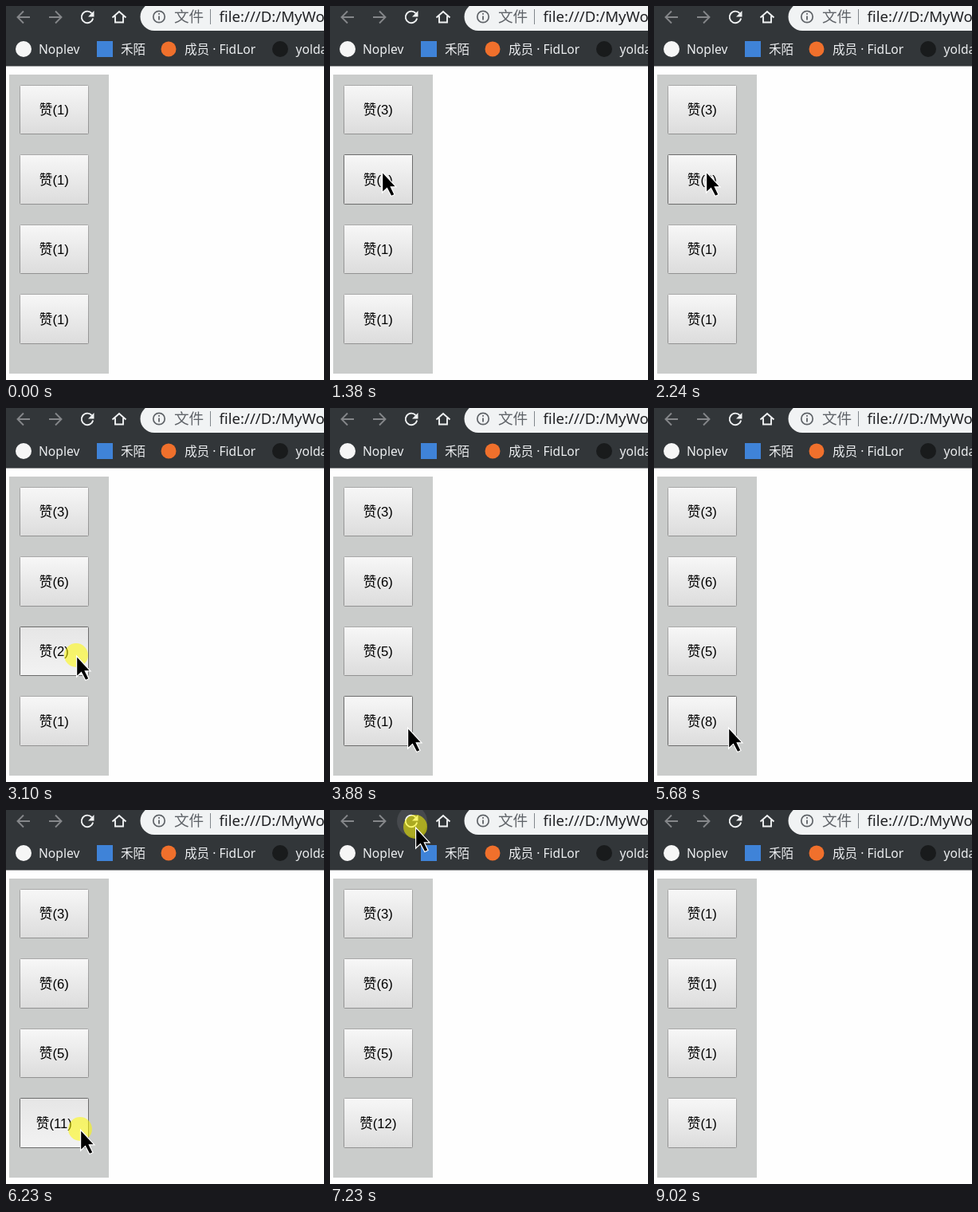
An HTML page that plays this animation: 399x469 px, repeating every 9.93 s.

```html
<!DOCTYPE html>
<html lang="zh-CN">
<head>
<meta charset="utf-8">
<title>赞</title>
<style>
  html, body { margin: 0; width: 100%; height: 100%; overflow: hidden; background: #fefefe; }
  svg { display: block; width: 399px; height: 469px; cursor: default; }
  text { white-space: pre; }
  .ui { font-family: "Noto Sans", "Open Sans", "Noto Sans CJK SC", "Noto Sans CJK", sans-serif; }
  .mark { font-size: 15.6px; fill: #eceef0; }
  .url { font-size: 18.6px; }
  .icon { fill: none; stroke: #f1f3f4; stroke-width: 1.9; }
  .dim { stroke: #85878a; }
  .btn rect { fill: url(#up); stroke: url(#edge); }
  .btn text { font: 16.67px "Liberation Sans", "Noto Sans CJK SC", "Noto Sans CJK", sans-serif; text-anchor: middle; }
  .btn.hover rect { stroke: #6c6c6c; }
  .btn.active rect { fill: url(#down); }
</style>
</head>
<body>
<svg viewBox="0 0 399 469">
  <defs>
    <linearGradient id="up" x2="0" y2="1">
      <stop stop-color="#f7f7f7"/><stop offset="1" stop-color="#dcdcdc"/>
    </linearGradient>
    <linearGradient id="down" x2="0" y2="1">
      <stop stop-color="#e6e6e6"/><stop offset="1" stop-color="#f2f2f2"/>
    </linearGradient>
    <linearGradient id="edge" x2="0" y2="1">
      <stop stop-color="#a8a8a8"/><stop offset="1" stop-color="#929292"/>
    </linearGradient>
  </defs>

  <rect width="399" height="75.5" fill="#323639"/>
  <circle id="glow" cx="103" cy="14" r="19" fill="#46494d"/>
  <path class="icon dim" d="M30 14H15M22 6.5L14.5 14L22 21.5"/>
  <path class="icon dim" d="M54 14H69M62 6.5L69.500 14L62 21.5"/>
  <path class="icon" d="M107.500 9A7.300 7.300 0 1 0 109.200 15.500"/>
  <path d="M110.500 6V13.500H103Z" fill="#f1f3f4"/>
  <path class="icon" d="M133.500 14.500L142 7L150.500 14.500M137 12.500V20.500H147V12.500"/>

  <rect x="168.500" y="-4" width="260" height="35" rx="17.500" fill="#f1f3f4"/>
  <circle cx="192" cy="13.500" r="7.200" fill="none" stroke="#5f6368" stroke-width="1.700"/>
  <path d="M192 12.500V17.500M192 9V10.800" stroke="#5f6368" stroke-width="1.800"/>
  <text class="ui url" x="211" y="19.500" fill="#5f6368">文件</text>
  <path d="M256.500 4V23" stroke="#80868b"/>
  <text class="ui url" x="267.500" y="19.500" fill="#202124">file:///D:/MyWork</text>

  <circle cx="22" cy="54" r="10" fill="#f6f6f6"/>
  <text class="ui mark" x="41" y="60">Noplev</text>
  <rect x="114" y="44" width="20" height="20" fill="#3f83d8"/>
  <text class="ui mark" x="144" y="60">禾陌</text>
  <circle cx="204" cy="54" r="9.500" fill="#f0702c"/>
  <text class="ui mark" x="224" y="60">成员 · FidLor</text>
  <circle cx="344" cy="54" r="10" fill="#191b1c"/>
  <text class="ui mark" x="363.500" y="60">yoldan</text>

  <rect x="4" y="86" width="125" height="375" fill="#cacccb"/>
  <g id="list"></g>
  <circle id="press" r="15" fill="#fffa00" fill-opacity=".55"/>
  <path id="arrow" d="M.6 1V27L6.500 21.500L11.800 31.500L16 29.500L11.300 19.800H18Z" fill="#000" stroke="#fff" stroke-width="1.200"/>
</svg>
<script>
const LOOP = 9930, STEP = 75, GAP = 78;
const ENTER = 220, LEAVE = 9020, RESET = 7380;
const $ = id => document.getElementById(id);

// each move eases on from the last place; bend is an optional control point
const moves = [
  { at: ENTER, steps: 1, to: [201, 279] },
  { at: 300, steps: 4, to: [72, 152] },
  { at: 1230, steps: 3, to: [65, 207] },
  { at: 2310, steps: 7, to: [88, 310] },
  { at: 3640, steps: 4, to: [97, 400] },
  { at: 3970, steps: 1, to: [93, 400] },
  { at: 6690, steps: 7, to: [107, 21], bend: [300, 230] },
  { at: 8000, steps: 2, to: [275, 307] },
  { at: 8230, steps: 3, to: [321, 394] },
  { at: 8690, steps: 4, to: [335, 456] }
];

// bursts of even clicks per button: first press, last release, count
const bursts = [
  [[610, 1000, 2]],
  [[1460, 1840, 3], [2010, 2240, 2]],
  [[2880, 3410, 4]],
  [[3970, 4750, 3], [4820, 5130, 2], [5360, 5680, 2], [5760, 6150, 3], [6230, 6610, 1]]
];
const reload = [[7230, 7300, 1]];

// releases so far, and whether the button is held now
function clicks(list, t) {
  let count = 0, held = false;
  for (const [from, to, n] of list) {
    if (t < from) break;
    const period = (to - from + GAP) / n;
    const done = Math.min(n, Math.floor((t - from + GAP) / period));
    count += done;
    held = done < n && t >= from + done * period;
  }
  return { count, held };
}

const buttons = bursts.map((list, i) => {
  const add = (parent, tag, attrs) => {
    const el = document.createElementNS("http://www.w3.org/2000/svg", tag);
    for (const k in attrs) el.setAttribute(k, attrs[k]);
    return parent.appendChild(el);
  };
  const top = Math.floor(99 + 87.5 * i), bottom = Math.floor(161.5 + 87.5 * i);
  const g = add($("list"), "g", { class: "btn" });
  add(g, "rect", { x: 17.5, y: top + .5, width: 86, height: bottom - top - 1, rx: 1 });
  const label = add(g, "text", { x: 60.3, y: Math.round((top + bottom) / 2) + 6 });
  return { g, label, top, bottom, list };
});

function pointer(t) {
  let pos = [201, 279];
  for (const { at, steps, to, bend } of moves) {
    if (t < at) break;
    const k = Math.min(1, (Math.floor((t - at) / STEP) + 1) / steps);
    pos = pos.map((a, i) => {
      const b = bend ? bend[i] : (a + to[i]) / 2;
      return (1 - k) ** 2 * a + 2 * k * (1 - k) * b + k * k * to[i];
    });
  }
  return pos;
}

const show = (el, on) => el.setAttribute("visibility", on ? "visible" : "hidden");

function draw(t) {
  const [x, y] = pointer(t);
  const visible = t >= ENTER && t < LEAVE;
  let pressed = clicks(reload, t).held;

  for (const { g, label, top, bottom, list } of buttons) {
    const { count, held } = clicks(list, t);
    const hover = visible && x >= 17 && x < 104 && y >= top && y < bottom;
    const text = `赞(${t < RESET ? 1 + count : 1})`;
    if (label.textContent !== text) label.textContent = text;
    g.setAttribute("class", "btn" + (hover ? " hover" : "") + (held ? " active" : ""));
    pressed = pressed || held;
  }

  for (const el of [$("arrow"), $("press")]) el.setAttribute("transform", `translate(${x} ${y})`);
  show($("arrow"), visible);
  show($("press"), pressed);
  show($("glow"), t >= 7140 && t < 8230);
}

const begin = performance.now();
function tick(now) {
  draw(Math.max(0, now - begin) % LOOP);
  requestAnimationFrame(tick);
}
draw(0);
requestAnimationFrame(tick);
</script>
</body>
</html>
```
